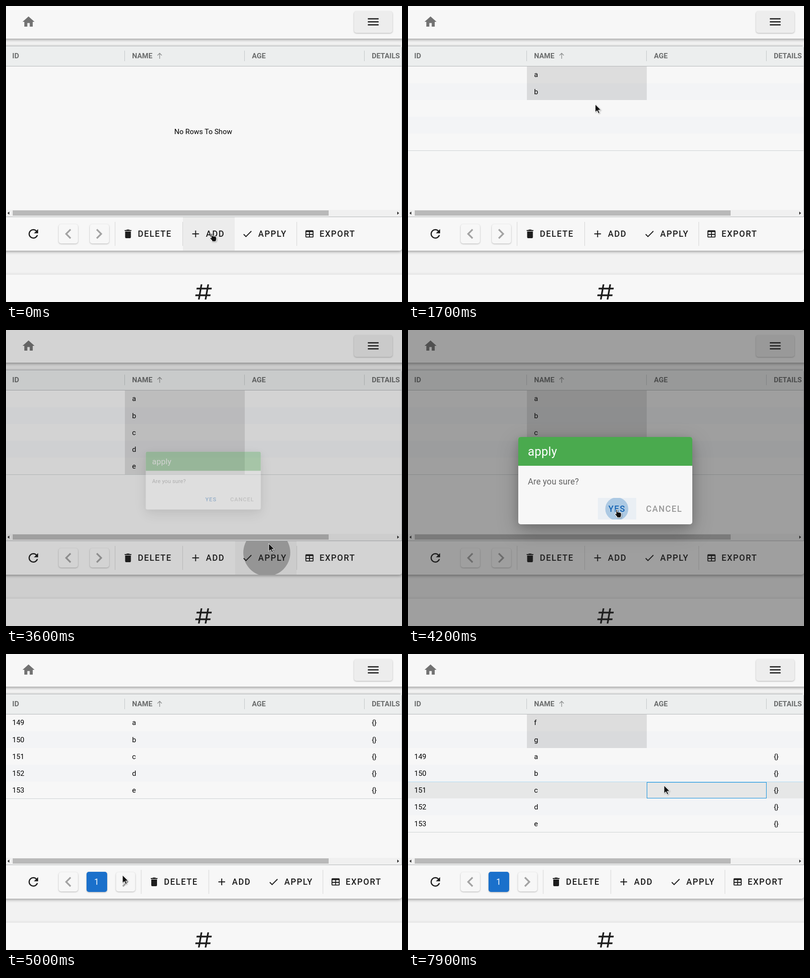
These frames come from a looping animation (826x617 px, 8000 ms). An HTML page:

```html
<!DOCTYPE html>
<html lang="en">
<head>
<meta charset="utf-8">
<title>Editable table</title>
<style>
html, body { margin: 0; width: 100%; height: 100%; overflow: hidden; background: #f2f2f2; }
svg { display: block; }
#stage { position: absolute; left: 0; top: 0; }
text { font-family: Roboto, sans-serif; white-space: pre; }
.head text { font-size: 15px; font-weight: 700; fill: #6b6d6d; }
.cell { font-size: 15px; fill: #000; }
.btn { font-size: 17.5px; font-weight: 500; letter-spacing: .0893em; fill: #1d1d1d; }
.bar { fill: #f7f7f7; filter: drop-shadow(0 2px 3px rgba(0,0,0,.38)); }
.low { fill: #f7f7f7; filter: drop-shadow(0 0 3px rgba(0,0,0,.12)); }
.raised { filter: drop-shadow(0 1.5px 1.5px rgba(0,0,0,.27)); }
.dialog { filter: drop-shadow(0 14px 22px rgba(0,0,0,.24)) drop-shadow(0 4px 8px rgba(0,0,0,.14)); }
</style>
</head>
<body>
<svg id="stage" width="826" height="617" viewBox="0 0 826 617">
  <rect width="826" height="617" fill="#f2f2f2"/>
  <rect class="low" x="-10" y="560" width="846" height="80"/>
  <rect class="bar" x="-10" y="-10" width="846" height="78"/>
  <rect class="bar" x="-10" y="83" width="836" height="427" rx="5"/>
  <rect class="raised" x="726" y="11" width="80" height="45" rx="5" fill="#ededed"/>
  <g id="icons"></g>
  <g class="head">
    <rect y="83" width="825" height="42" fill="#eceeee"/>
    <path d="M0 83.5H823M0 125.5H826M825.5 86V439M0 439.5H826" stroke="#b5b8ba" fill="none"/>
    <path d="M247.5 93V115M497.5 93V115M747.5 93V115" stroke="#c3c7c8"/>
    <text x="13" y="109">ID</text>
    <text x="263" y="109">NAME</text>
    <text x="513" y="109">AGE</text>
    <text x="763" y="109">DETAILS</text>
    <path d="M320.5 110V98.5M316 103L320.5 98.5L325 103" fill="none" stroke="#8b8d8d" stroke-width="1.3"/>
  </g>
  <g>
    <rect y="425" width="825" height="14" fill="#f0f0f0"/>
    <rect x="14" y="426" width="659" height="11" fill="#b9b9b9"/>
    <path d="M7 428.5V435L3 431.7ZM816 428.5V435L820 431.7Z" fill="#333"/>
  </g>
  <g id="grid"></g>
  <g id="tools"></g>
  <g id="modal"></g>
  <g id="pointer"></g>
</svg>
<script>
const LOOP = 8000, STEP = 100, ROW = 35;
const $ = id => document.getElementById(id);

const ICON = {
  home: 'M10,20V14H14V20H19V12H22L12,3L2,12H5V20H10Z',
  menu: 'M3,6H21V8H3V6M3,11H21V13H3V11M3,16H21V18H3V16Z',
  pound: 'M5.41,21L6.12,17H2.12L2.47,15H6.47L7.53,9H3.53L3.88,7H7.88L8.59,3H10.59L9.88,7H15.88L16.59,3H18.59L17.88,7H21.88L21.53,9H17.53L16.47,15H20.47L20.12,17H16.12L15.41,21H13.41L14.12,17H8.12L7.41,21H5.41M9.53,9L8.47,15H14.47L15.53,9H9.53Z',
  refresh: 'M17.65,6.35C16.2,4.9 14.21,4 12,4A8,8 0 0,0 4,12A8,8 0 0,0 12,20C15.73,20 18.84,17.45 19.73,14H17.65C16.83,16.33 14.61,18 12,18A6,6 0 0,1 6,12A6,6 0 0,1 12,6C13.66,6 15.14,6.69 16.22,7.78L13,11H20V4L17.65,6.35Z',
  prev: 'M15.41,16.58L10.83,12L15.41,7.41L14,6L8,12L14,18L15.41,16.58Z',
  next: 'M8.59,16.58L13.17,12L8.59,7.41L10,6L16,12L10,18L8.59,16.58Z',
  trash: 'M19,4H15.5L14.5,3H9.5L8.5,4H5V6H19M6,19A2,2 0 0,0 8,21H16A2,2 0 0,0 18,19V7H6V19Z',
  plus: 'M19,13H13V19H11V13H5V11H11V5H13V11H19V13Z',
  check: 'M21,7L9,19L3.5,13.5L4.91,12.09L9,16.17L19.59,5.59L21,7Z',
  table: 'M5,4H19A2,2 0 0,1 21,6V18A2,2 0 0,1 19,20H5A2,2 0 0,1 3,18V6A2,2 0 0,1 5,4M5,8V12H11V8H5M13,8V12H19V8H13M5,14V18H11V14H5M13,14V18H19V14H13Z'
};
const CURSOR = {
  arrow: '<path d="M0 0V16.5L3.9 13L6.6 19L9.2 17.8L6.6 12H12Z" fill="#111" stroke="#fff" stroke-width="1"/>',
  hand: '<path d="M3 1.5Q4.3 0 5.6 1.5V6L12 7.5Q14 8 14 10V14L12.5 18H5L4.5 16L.5 11.5Q0 9.5 2 9.5L3 10.3Z" fill="#111" stroke="#fff" stroke-width="1.2"/>',
  beam: '<path d="M-3 -6.5H3M-3 6.5H3M0 -6.5V6.5" stroke="#fff" stroke-width="3"/><path d="M-3 -6.5H3M-3 6.5H3M0 -6.5V6.5" stroke="#111" stroke-width="1.2"/>'
};

// time, shape, x, y
const POINTER = [
  [0, 'hand', 425, 473], [600, 'hand', 425, 473], [700, 'arrow', 402, 370], [800, 'arrow', 388, 242],
  [900, 'arrow', 388, 180], [1100, 'arrow', 390, 146], [1200, 'beam', 390, 150], [1300, 'arrow', 390, 155],
  [1500, 'beam', 390, 185], [1600, 'arrow', 390, 190], [1800, 'beam', 391, 220], [2000, 'arrow', 391, 233],
  [2400, 'arrow', 392, 278], [2600, 'beam', 392, 302], [2800, 'arrow', 400, 300], [3100, 'arrow', 460, 370],
  [3400, 'arrow', 540, 437], [3600, 'arrow', 548, 445], [3700, 'arrow', 540, 437], [4000, 'hand', 431, 373],
  [4400, 'hand', 431, 373], [4500, 'arrow', 422, 382], [5000, 'arrow', 243, 461], [5300, 'arrow', 205, 468],
  [5400, 'hand', 176, 473], [5600, 'arrow', 215, 471], [6100, 'hand', 448, 474], [6700, 'hand', 448, 474],
  [6800, 'arrow', 425, 400], [7100, 'arrow', 292, 150], [7300, 'beam', 295, 152], [7500, 'beam', 296, 158],
  [7600, 'arrow', 325, 183], [7900, 'arrow', 534, 274]
];
// time, flat shade, circle shade, circle radius
const ADD_INK = [
  [0, .045, 0, 0], [200, .045, 0, 0], [300, .07, .12, 20], [500, .15, .18, 44], [700, .28, .21, 56],
  [800, .31, .21, 58], [900, .2, .12, 62], [1000, .09, .04, 64], [1100, 0, 0, 64], [6300, 0, 0, 0],
  [6400, .05, .14, 32], [6600, .12, .17, 50], [6700, .12, .17, 56], [6800, .1, .1, 60], [7100, 0, 0, 64]
];
const APPLY_INK = [[3400, 0, 0, 0], [3500, .04, .2, 28], [3600, .03, .28, 49], [3700, .03, .24, 68], [3900, 0, 0, 80]];
const YES_INK = [[4000, .05, 0, 0], [4100, .05, .25, 10], [4200, .05, .28, 24], [4300, .05, .28, 38], [4500, .05, .1, 60]];
// time, overlay, dialog opacity, dialog scale
const MODAL = [
  [3400, 0, 0, .4], [3500, .06, .08, .52], [3600, .17, .32, .661], [3700, .29, .72, .86], [3800, .37, .94, .97],
  [3900, .41, 1, 1], [4300, .41, 1, 1], [4400, .29, .55, .84], [4500, .12, .12, .6], [4600, 0, 0, .5]
];
// letter, row, edit start, commit
const EDITS = [
  ['a', 0, 1200, 1300], ['b', 1, 1500, 1600], ['c', 2, 1800, 2100], ['d', 3, 2200, 2400], ['e', 4, 2600, 2700],
  ['f', 0, 7300, 7500], ['g', 1, 7600, 7800]
];
// from, to, hovered row, strength
const HOVERS = [[700, 800, 4, .05], [800, 900, 4, .015], [2100, 2400, 3, .07], [2400, 2900, 4, .07], [7900, 8000, 4, .07]];
const SAVED = 4600;

function track(keys, t) {
  let i = 0;
  while (i < keys.length - 1 && keys[i + 1][0] <= t) i++;
  const a = keys[i], b = keys[i + 1] || a;
  const k = b === a ? 0 : Math.max(0, (t - a[0]) / (b[0] - a[0]));
  return a.slice(1).map((v, j) => typeof v === 'number' ? v + (b[j + 1] - v) * k : v);
}

const rect = (x, y, w, h, fill, more = '') => `<rect x="${x}" y="${y}" width="${w}" height="${h}" fill="${fill}" ${more}/>`;
const text = (x, y, s, more = 'class="cell"') => `<text x="${x}" y="${y}" ${more}>${s}</text>`;
const icon = (name, cx, cy, k, fill = '#1d1d1d') =>
  `<path transform="translate(${cx - 12 * k} ${cy - 12 * k}) scale(${k})" d="${ICON[name]}" fill="${fill}"/>`;

function ink(x, y, w, h, cx, cy, [flat, shade, r], fill = '#000') {
  return `<svg x="${x}" y="${y}" width="${w}" height="${h}">` + rect(0, 0, w, h, fill, `opacity="${flat}"`) +
    `<circle cx="${cx - x}" cy="${cy - y}" r="${r}" fill="${fill}" opacity="${shade}"/></svg>`;
}

function rowsAt(t) {
  const fresh = { name: '', id: '', dirty: false };
  const entry = ([s, , , done]) => t >= done ? { name: s, id: '', dirty: true } : fresh;
  if (t < SAVED) {
    const n = Math.max(0, Math.min(5, Math.floor((t - 200) / 100)));
    return EDITS.slice(0, n).map(entry);
  }
  const added = t < 6400 ? 0 : t < 6600 ? 1 : 2;
  const saved = EDITS.slice(0, 5).map(([s], i) => ({ name: s, id: 149 + i, dirty: false }));
  return EDITS.slice(5, 5 + added).map(entry).concat(saved);
}

function drawGrid(t) {
  const rows = rowsAt(t);
  if (!rows.length) return text(351, 267, 'No Rows To Show');
  const hover = HOVERS.find(h => t >= h[0] && t < h[1]);
  let out = '';
  rows.forEach((r, i) => {
    const y = 126 + ROW * i, base = 149 + ROW * i - (i ? 0 : 1);
    out += rect(0, y, 825, ROW, i % 2 ? '#f3f4f6' : '#f7f7f7');
    if (hover && hover[2] === i) out += rect(0, y, 825, ROW, '#001a1a', `opacity="${hover[3]}"`);
    if (r.dirty) out += rect(248, y, 250, ROW, '#000', 'opacity=".105"');
    out += rect(0, y + ROW, 825, 1, '#cfd2d4');
    out += text(13, base, r.id) + text(263, base, r.name);
    if (r.id) out += text(763, base, '{}');
  });
  const edit = EDITS.find(e => t >= e[2] && t < e[3]);
  if (edit) {
    const y = 126 + ROW * edit[1];
    out += rect(248.5, y + 1.5, 248.5, 33.5, '#f0f0f0', 'rx="2" stroke="#4b6a78" stroke-width="1.4"') +
      `<path d="M248.5 ${y + 2}V${y + 34}M250.5 ${y + 3}V${y + 33}" stroke="#1593dc"/>` +
      text(251, y + 23, edit[0]) + rect(259, y + 10, 1, 17, '#000');
  }
  if (t >= 7900) {
    out += rect(0, 266, 825, 1, '#b5dcf3') + rect(498.5, 267.5, 249, 33, 'none', 'stroke="#1290dc"');
  }
  return out;
}

function drawTools(t) {
  const paged = t >= SAVED, dx = paged ? 54.5 : 0;
  const chip = x => rect(x, 455, 40, 40, '#f7f7f7', 'rx="5" class="raised"');
  const add = track(ADD_INK, t), apply = track(APPLY_INK, t);
  let out = icon('refresh', 57, 475, 1.25) + chip(110) + icon('prev', 130, 475, 1.75, '#a3a3a3') +
    chip(175 + dx) + icon('next', 194 + dx, 475, 1.75, '#a3a3a3');
  if (paged) {
    out += rect(168, 454, 43, 42, '#1a70cb', 'rx="5" class="raised"') +
      text(189, 481, '1', 'text-anchor="middle" font-size="17.5" fill="#fff"');
  }
  out += ink(369 + dx, 440, 108, 70, 423 + dx, 475, add);
  if (t >= 3500 && t < 3900) out += ink(478, 440, 128, 70, 544, 464, apply);
  for (const x of [227, 368, 606]) out += rect(x + dx, 450, 1, 50, '#d5d5d5');
  const items = [['trash', 254.5, 275, 'DELETE'], ['plus', 395.5, 417, 'ADD'], ['check', 503.5, 526, 'APPLY'], ['table', 633, 654, 'EXPORT']];
  for (const [name, cx, x, label] of items) {
    out += icon(name, cx + dx, 475, name === 'table' ? .94 : 1) + text(x + dx, 481, label, 'class="btn"');
  }
  return out;
}

function drawModal(t) {
  const [shade, alpha, k] = track(MODAL, t);
  if (!shade) return '';
  const yes = t >= 4000 ? ink(396, 350, 80, 45, 435.5, 373, track(YES_INK, t), '#0d65b8') : '';
  return rect(0, 0, 826, 617, '#212121', `opacity="${shade}"`) +
    `<g opacity="${alpha}" transform="translate(411.5 314) scale(${k}) translate(-411.5 -314)">` +
    rect(230, 223, 363, 182, '#f7f7f7', 'rx="5" class="dialog"') +
    '<path d="M230 283V228Q230 223 235 223H588Q593 223 593 228V283Z" fill="#4aaa4e"/>' +
    text(250, 262, 'apply', 'font-size="25" letter-spacing=".3" fill="#fff"') +
    text(250, 322, 'Are you sure?', 'font-size="17.5" letter-spacing=".12" fill="#626262"') + yes +
    text(418, 379, 'YES', 'class="btn" style="fill:#1262b3"') +
    text(496.5, 379, 'CANCEL', 'class="btn" style="fill:#999"') + '</g>';
}

function drawPointer(t) {
  const [shape, x, y] = track(POINTER, t);
  return `<g transform="translate(${x} ${y})" style="filter:drop-shadow(1px 1px 1px rgba(0,0,0,.3))">${CURSOR[shape]}</g>`;
}

$('icons').innerHTML = icon('home', 47, 33, 1.25, '#727272') + icon('menu', 766, 33, 1.25) + icon('pound', 412, 596, 1.75);

const start = performance.now();
let shown = -1;
function frame() {
  const t = Math.floor((performance.now() - start) % LOOP / STEP) * STEP;
  if (t !== shown) {
    shown = t;
    $('grid').innerHTML = drawGrid(t);
    $('tools').innerHTML = drawTools(t);
    $('modal').innerHTML = drawModal(t);
    $('pointer').innerHTML = drawPointer(t);
  }
  requestAnimationFrame(frame);
}
frame();
</script>
</body>
</html>
```
